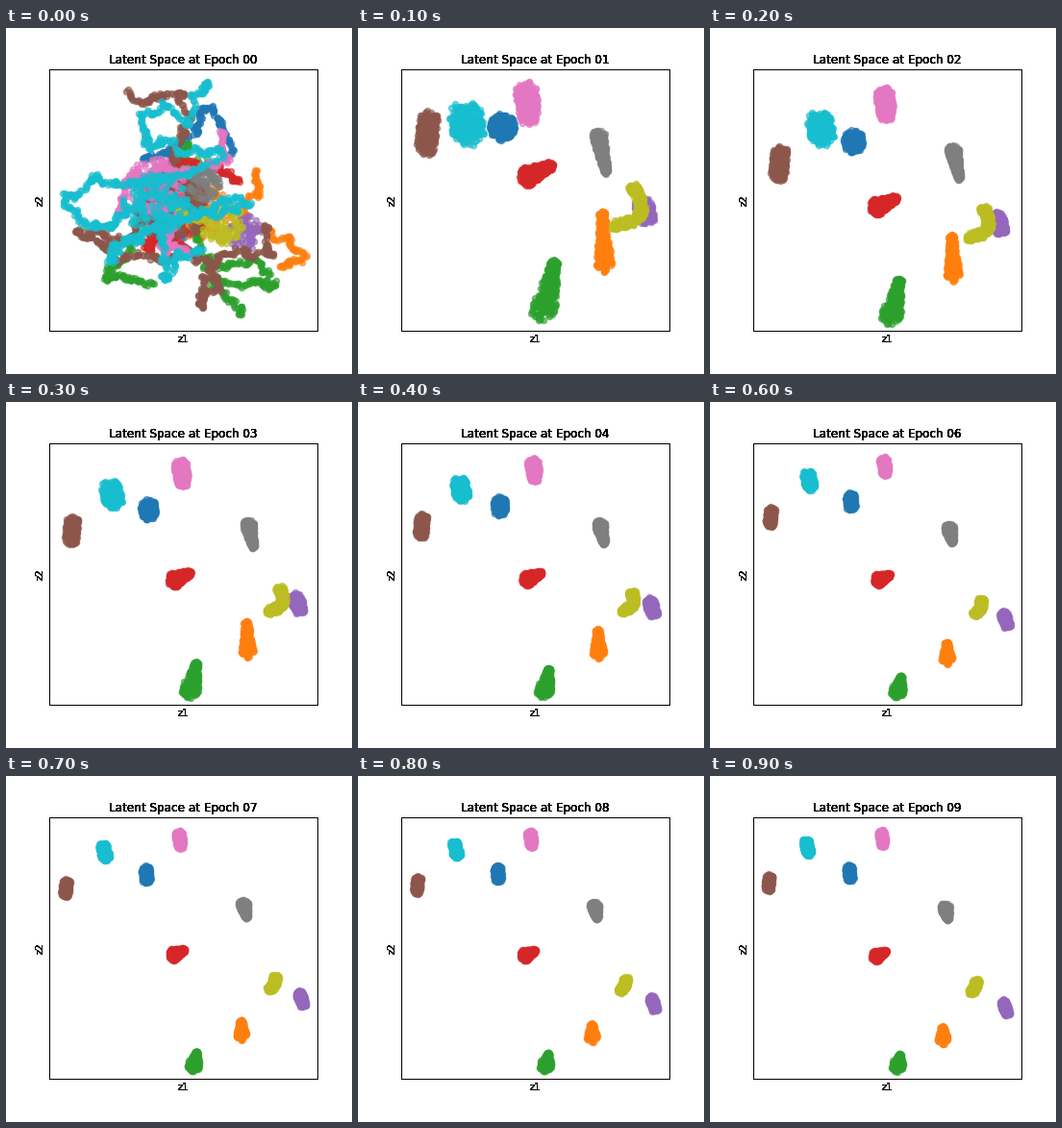
Animation, 360 px wide and 360 px high, one loop 1 s. Source, as a matplotlib script:

```python
import numpy as np
import matplotlib.pyplot as plt
from matplotlib.animation import FuncAnimation

SIZE, DPI, EPOCHS = 360, 72, 10
LEFT, RIGHT, TOP, BOTTOM = 45, 324, 43.2, 315
DOT = 3.75
FINAL_LENGTH, FINAL_WIDTH = 12.5, 7.5
rng = np.random.default_rng(7)

plt.rcParams["font.family"] = "DejaVu Sans"
fig = plt.figure(figsize=(SIZE / DPI, SIZE / DPI), dpi=DPI, facecolor="white")
ax = fig.add_axes([LEFT / SIZE, 1 - BOTTOM / SIZE,
                   (RIGHT - LEFT) / SIZE, (BOTTOM - TOP) / SIZE])
ax.set(xlim=(LEFT, RIGHT), ylim=(BOTTOM, TOP), xticks=[], yticks=[])  # pixel units
for spine in ax.spines.values():
    spine.set_linewidth(1)


def heavy_text(x, y, text, size, **style):
    """Stack copies so the soft glyph edges turn nearly solid."""
    return [fig.text(x / SIZE, 1 - y / SIZE, text, size=size, ha="center",
                     rotation_mode="anchor", **style) for _ in range(8)]


mid_x, mid_y = (LEFT + RIGHT) / 2, (TOP + BOTTOM) / 2
titles = heavy_text(mid_x, TOP - 6, "", 12, va="baseline")
heavy_text(mid_x, BOTTOM + 4, "z1", 10, va="top")
heavy_text(LEFT - 4, mid_y, "z2", 10, va="bottom", rotation=90)


def disc(n):
    angle, radius = rng.uniform(0, 2 * np.pi, n), np.sqrt(rng.random(n))
    return np.column_stack([radius * np.cos(angle), radius * np.sin(angle)])


def bridge(a, b):
    """Random walk tied to both end points."""
    a, b = np.array(a), np.array(b)
    n = int(np.hypot(*(b - a)) / 1.2) + 8
    t = np.linspace(0, 1, n)[:, None]
    walk = np.cumsum(rng.normal(0, 1.6, (n, 2)), axis=0)
    return a + (b - a) * t + walk - walk[-1] * t


class Cluster:
    """A tangle of walks that turns into a bent, tapered and shrinking blob."""

    def __init__(self, color, centres, length, width, lean, taper=0, bend=0,
                 core=(172, 185, 38), route=(), n=300):
        x, y, radius = core
        tangle = [np.array([x, y]) + radius * disc(int(radius * 4))]
        tangle += [bridge(a, b) for a, b in zip(route, route[1:])]
        self.start = np.vstack(tangle)
        self.centres = np.array(centres)
        self.length, self.width, self.taper, self.bend = length, width, taper, bend
        lean = np.radians(lean)
        self.along = np.array([np.sin(lean), np.cos(lean)])
        self.across = np.array([np.cos(lean), -np.sin(lean)])
        self.s = np.clip(rng.uniform(-1.25, 1.25, n), -1, 1)[:, None]
        self.offset = disc(n)
        self.dots = ax.scatter([], [], s=36, lw=1.5, alpha=0.6, color=color)

    def centre(self, epoch):
        keys = (1, 2, 5, 9)
        i = min(np.searchsorted(keys, epoch, side="right") - 1, len(keys) - 2)
        mix = ((epoch - keys[i]) / (keys[i + 1] - keys[i])) ** 0.7
        return (1 - mix) * self.centres[i] + mix * self.centres[i + 1]

    def positions(self, epoch):
        if epoch == 0:
            return self.start
        decay = np.exp((1 - epoch) / 2.5)
        length = FINAL_LENGTH + (self.length - FINAL_LENGTH) * decay
        width = FINAL_WIDTH + (self.width - FINAL_WIDTH) * decay
        bow = self.bend * decay * (0.5 - self.s ** 2)
        spread = width * (1 - self.taper * self.s) - DOT
        return (self.centre(epoch) + (length - width) * self.s * self.along
                + bow * self.across + spread * self.offset)


clusters = [
    Cluster("tab:blue", [(150, 103), (149, 118), (147, 105), (145, 101)], 18, 17, 5,
            route=[(140, 135), (200, 108), (205, 83), (222, 100), (229, 136)]),
    Cluster("tab:orange", [(255, 220), (252, 237), (249, 254), (242, 268)], 36, 10, 3,
            taper=-0.25, core=(205, 190, 30),
            route=[(258, 151), (245, 200), (290, 218), (310, 235), (285, 248)]),
    Cluster("tab:green", [(198, 269), (192, 281), (197, 292), (196, 296)], 37, 13, -14,
            taper=-0.35, core=(190, 150, 25),
            route=[(155, 268), (105, 262), (125, 240), (190, 120), (205, 250),
                   (265, 245), (280, 268), (215, 262), (245, 298)]),
    Cluster("tab:red", [(187, 149), (182, 182), (182, 181), (177, 185)], 24, 11, 114,
            taper=0.25, route=[(245, 158), (180, 140), (150, 160), (150, 230), (190, 230)]),
    Cluster("tab:purple", [(298, 190), (300, 203), (307, 217), (307, 241)], 19, 13, 20,
            core=(248, 213, 18)),
    Cluster("tab:brown", [(72, 109), (72, 141), (64, 125), (61, 111)], 28, 14, -6,
            route=[(125, 68), (185, 68), (175, 125), (135, 215), (72, 212), (110, 238),
                   (208, 240), (205, 290), (222, 270), (225, 235), (278, 235), (270, 208)]),
    Cluster("tab:pink", [(176, 78), (182, 79), (183, 68), (179, 65)], 27, 15, 8,
            core=(155, 165, 30),
            route=[(224, 105), (230, 138), (185, 150), (130, 155), (125, 190),
                   (185, 190), (165, 235), (190, 235)]),
    Cluster("tab:gray", [(254, 131), (256, 142), (253, 136), (246, 143)], 27, 9, 12,
            taper=0.25, core=(206, 162, 17)),
    Cluster("tab:olive", [(285, 189), (283, 205), (283, 210), (275, 219)], 31, 9, -25,
            bend=18, core=(225, 203, 23), route=[(175, 183), (225, 190)]),
    Cluster("tab:cyan", [(113, 99), (115, 104), (104, 86), (101, 74)], 28, 21, 15,
            core=(155, 182, 33),
            route=[(208, 58), (190, 98), (140, 90), (150, 125), (225, 130), (150, 160),
                   (95, 155), (60, 185), (105, 205), (150, 170), (255, 182), (165, 195),
                   (108, 243), (165, 210), (165, 262), (205, 230)]),
]


def update(epoch):
    for title in titles:
        title.set_text(f"Latent Space at Epoch {epoch:02d}")
    for cluster in clusters:
        cluster.dots.set_offsets(cluster.positions(epoch))
    return [*titles, *(c.dots for c in clusters)]


anim = FuncAnimation(fig, update, frames=EPOCHS, interval=100, repeat=True, repeat_delay=0)
plt.show()
```
